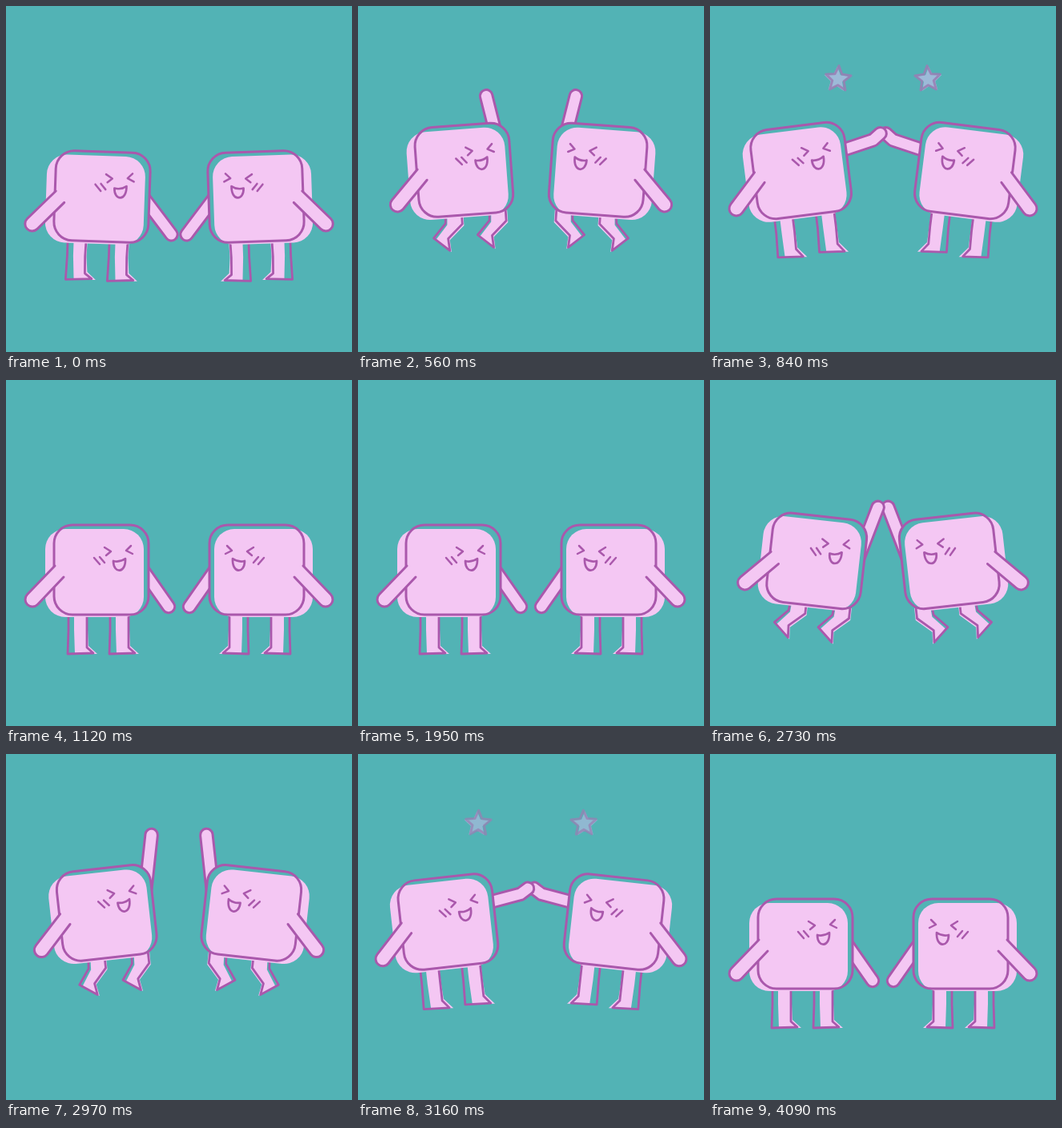
An HTML page with a canvas that plays this animation: 432x432 px, repeating every 4220 ms.

```html
<!DOCTYPE html>
<html lang="en">
<head>
<meta charset="utf-8">
<title>High five</title>
<style>
html, body { margin: 0; width: 100%; height: 100%; overflow: hidden; background: #52b3b5; }
canvas { display: block; width: 100vw; height: 100vh; }
</style>
</head>
<body>
<canvas id="stage" width="432" height="432"></canvas>
<script>
const ctx = document.getElementById('stage').getContext('2d');
const TEAL = '#52b3b5', PINK = '#f4c7f3', PURPLE = '#aa58ac';
const LOOP = 4220, END = 32, TAKEOFF = 10.4, LANDING = 29.4;
const RAD = Math.PI / 180;

// Eases through a few [step, value] stops
function track(step, ...stops) {
  const i = stops.findIndex(([at]) => at > step);
  if (i < 0) return stops[stops.length - 1][1];
  if (i === 0) return stops[0][1];
  const [t0, a] = stops[i - 1], [t1, b] = stops[i], k = (step - t0) / (t1 - t0);
  return a + (b - a) * k * k * (3 - 2 * k);
}

// Crouch, ballistic flight, then rest
function height(step) {
  if (step < TAKEOFF) return 238 + 26 * Math.sin(Math.PI * step / TAKEOFF);
  if (step < LANDING) return 198 + .446 * (step - (TAKEOFF + LANDING) / 2) ** 2;
  return 237;
}

function poseAt(step) {
  const angle = RAD * track(step, [0, 51], [4, -5], [16, -100], [25, -13], [END, 55]);
  const reach = track(step, [0, 62], [4, 63], [17, 84], [25, 56], [END, 61]);
  const shoulder = track(step, [0, -4], [4, 8], [25, -18], [END, -4]);
  return {
    x: track(step, [0, 120], [14, 134], [26, 112], [END, 119]),
    y: height(step),
    tilt: track(step, [0, 2], [5, 22], [18, -6], [22, -8], [END, 0]),
    bend: track(step, [9, 0], [12, 1], [17, 1], [25, 0]),
    kink: track(step, [20, 0], [24, 1], [29, 0]),
    shoulder,
    hand: [49 + reach * Math.cos(angle), shoulder + reach * Math.sin(angle)]
  };
}

function trace(points) {
  ctx.beginPath();
  points.forEach(([x, y]) => ctx.lineTo(x, y));
}

function line(width = 3, color = PURPLE) {
  ctx.strokeStyle = color;
  ctx.lineWidth = width;
  ctx.stroke();
}

function fill(color = PINK) {
  ctx.fillStyle = color;
  ctx.fill();
}

function box(x, y, w, h, r) {
  ctx.beginPath();
  ctx.roundRect(x, y, w, h, r);
}

// The colour print slips sideways from the line print by different amounts along the leg
function legPath(dx, tilt, bend, slip) {
  const lean = Math.max(0, tilt / 20) * (1 - bend);
  const rear = dx - 41 + 14 * bend + slip * (7 + 5 * lean - 5 * bend);
  const front = dx - 18 + 11 * bend + slip * (1 + 8 * lean + bend);
  const knee = 75 - 10 * bend;
  const heel = dx - 42 - 2 * bend, sole = 105 - 23 * bend;
  const drop = slip * 2 * bend;
  trace([
    [rear, 54],
    [rear - bend, knee + drop],
    [heel + slip * (9 + 12 * lean - 6 * bend), sole + drop],
    [heel + 32 - 13 * bend + slip * (5 - 3 * bend) + 5 * lean,
      sole - 1 + 18 * bend - .45 * tilt * (1 - bend) + slip * (1 + bend)],
    [heel + 24 - 6 * bend + slip * (2 + 9 * lean) - 2 * lean,
      sole - 8 + 10 * bend - 5 * lean + drop - slip * 2 * (1 - bend)],
    [front - 7 * lean, knee + 2 * bend + 3 * lean + drop],
    [front, 54]
  ]);
}

function drawLegs({ tilt, bend }) {
  for (const dx of [0, 52 + 3 * bend]) {
    legPath(dx, tilt, bend, 1);
    fill();
    legPath(dx, tilt, bend, 0);
    line(2.8);
  }
}

function drawInnerArm({ shoulder, hand: [x, y], kink }) {
  const wrist = [49 + (x - 49) * .82, shoulder + (y - shoulder) * .82 + 4 * kink];
  trace([[49, shoulder], wrist, [x, y]]);
  line(18.5);
  line(12.5, PINK);
}

function drawOuterArm() {
  const a = Math.atan2(35, -33.5);
  ctx.beginPath();
  ctx.moveTo(-58, -5);
  ctx.arc(-86, 37, 9, a + Math.PI / 2, a - Math.PI / 2, true);
  ctx.lineTo(-47, 9);
  fill();
  line();
}

function drawFace() {
  const marks = [
    [[4, -28], [12, -23], [6, -18]],
    [[37, -30], [31, -24], [39, -20]],
    [[-9, -15], [-2, -7]],
    [[-2, -16], [4, -9]]
  ];
  for (const mark of marks) { trace(mark); line(2.5); }
  ctx.beginPath();
  ctx.moveTo(15, -11);
  ctx.bezierCurveTo(15, 5, 31, 5, 30, -14);
  ctx.quadraticCurveTo(23, -9, 15, -11);
  line(2.7);
}

function drawBuddy(pose) {
  ctx.save();
  ctx.translate(pose.x, pose.y);
  ctx.rotate(pose.tilt * RAD);

  // Limbs stay outside the body's outline
  ctx.save();
  box(-59, -56, 118, 112, 23);
  ctx.rect(-300, -300, 600, 600);
  ctx.clip('evenodd');
  drawLegs(pose);
  drawInnerArm(pose);
  ctx.restore();

  box(-70, -51, 123, 110, 25);
  fill();
  box(-59, -56, 118, 112, 23);
  line();
  drawOuterArm();
  drawFace();
  ctx.restore();
}

function starPath(r) {
  trace(Array.from({ length: 10 }, (_, i) => {
    const a = i * Math.PI / 5 - Math.PI / 2, d = i % 2 ? r * .46 : r;
    return [d * Math.cos(a), d * Math.sin(a)];
  }));
  ctx.closePath();
}

function drawStar(step) {
  const s = (step - 20) / 10.4;
  if (s <= 0 || s >= 1) return;
  const out = 1 - (1 - s) ** 2, r = 16.5 * Math.min(1, s * 4);
  ctx.save();
  ctx.translate(216 - 90 * out, 116 - 40 * out);
  ctx.rotate(.35 * (.55 - s));
  ctx.globalAlpha = Math.min(1, 1.4 * (1 - s));
  ctx.translate(-2, 1);
  starPath(r);
  fill('#a9bbdd');
  ctx.translate(2, -1);
  starPath(r);
  line(3, '#9a7fb4');
  ctx.restore();
}

function mirrored(draw) {
  ctx.save();
  ctx.translate(432, 0);
  ctx.scale(-1, 1);
  draw();
  ctx.restore();
  draw();
}

// One jump on every second step, a rest, then one at full rate
function stepAt(t) {
  if (t < 1120) return 2 * Math.floor(t / 70);
  if (t < 2400) return END;
  return Math.min(END, 2 + Math.floor((t - 2392) / 33.33));
}

let start;
function frame(now) {
  start ??= now;
  const step = stepAt((now - start) % LOOP), pose = poseAt(step);
  ctx.fillStyle = TEAL;
  ctx.fillRect(0, 0, 432, 432);
  ctx.lineCap = ctx.lineJoin = 'round';
  mirrored(() => drawBuddy(pose));
  mirrored(() => drawStar(step));
  requestAnimationFrame(frame);
}
requestAnimationFrame(frame);
</script>
</body>
</html>
```
